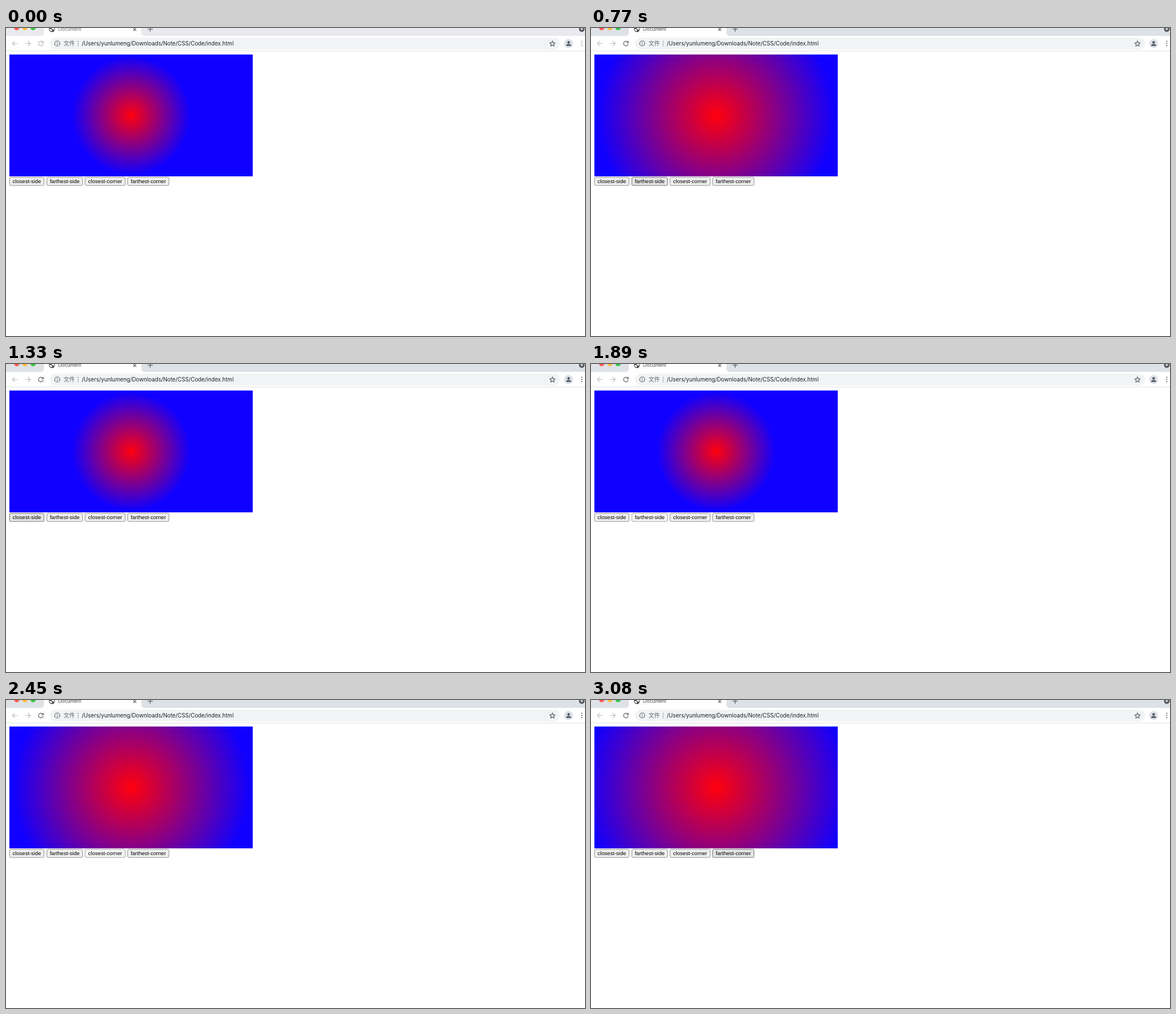
An HTML page that plays this animation: 1026x546 px, repeating every 3360 ms.

```html
<!DOCTYPE html>
<html lang="zh">
<head>
<meta charset="utf-8">
<title>Radial gradient sizes</title>
<style>
  html, body { margin: 0; width: 100%; height: 100%; overflow: hidden; background: #fff; }
  svg { display: block; }
  text { font-family: Inter, "Noto Sans CJK SC", "Noto Sans CJK", sans-serif; }
  .line { fill: none; stroke: #5f6368; stroke-width: 1.2; }
  .off { stroke: #babcbe; }
  .strip { fill: #dee1e6; }
  .title { fill: #45494d; }
  .reload { stroke: #5f6368; }
  .dots { fill: #5f6368; }
  .blurred .strip { fill: #e8eaed; }
  .blurred .title { fill: #6b6f73; }
  .blurred .reload { stroke: #b4b6b9; }
  .blurred .dots { fill: #a5a8ab; }
  .button rect { fill: #efefef; stroke: #767676; stroke-width: .8; }
  .button text { font: 9.58px "Liberation Sans", Arial, sans-serif; text-anchor: middle; }
  .hover rect { fill: #e5e5e5; stroke: #4f4f4f; }
  .active rect { fill: #f5f5f5; stroke: #8d8d8d; }
</style>
</head>
<body>
<svg id="stage" width="1026" height="546" viewBox="0 0 1026 546">
  <defs>
    <radialGradient id="glow" gradientUnits="userSpaceOnUse" cx="221.7" cy="155" r="108">
      <stop stop-color="#ff000c"/>
      <stop offset=".97" stop-color="#1000ff"/>
    </radialGradient>
  </defs>

  <!-- Tab strip -->
  <rect class="strip" width="1026" height="14"/>
  <path d="M61 14q6 0 6-6V-1H240V8q0 6 6 6z" fill="#fff"/>
  <circle cx="19" cy="-.6" r="4.6" fill="#fc5b57"/>
  <circle cx="33.5" cy="-.6" r="4.6" fill="#fdbc40"/>
  <circle cx="48" cy="-.6" r="4.6" fill="#34c84a"/>
  <circle cx="81.3" cy="2" r="5.2" fill="#45494d"/>
  <path d="M77 1.5l3 .6 1.7 1.6-.8 2.4q-3.4-.6-3.9-4.6zM82-1.5l3 .7.6 3.3-2 .8-1.2-1.5-2-.4z" fill="#fff"/>
  <text class="title" x="92.5" y="5.3" font-size="8.45">Document</text>
  <path class="line" d="M225.3-.3l5.4 5.4m0-5.4l-5.4 5.4M251 2.2h9M255.500-2.300v9"/>
  <circle cx="1020.3" cy="2" r="5" fill="#5a5d61"/>
  <path d="M1017.700 .8h5.200l-2.600 3z" fill="#fff"/>

  <!-- Toolbar -->
  <path d="M0 40.700H1026" stroke="#dcdee1"/>
  <rect x="78" y="17.300" width="904" height="20.400" rx="10.200" fill="#f1f3f4"/>
  <path class="line off" d="M20.300 27.500H11.500M15.800 23.200l-4.300 4.300 4.300 4.300M34.200 27.500H43M38.700 23.200l4.300 4.300-4.300 4.300"/>
  <path class="line reload" d="M65.300 25A4.200 4.200 0 1 0 66 28.500M66.200 22.800v3.300h-3.400"/>
  <circle class="line" cx="90.800" cy="27.500" r="4.500" stroke-width="1"/>
  <path class="line" d="M90.800 27v3M90.800 24.800v1.200"/>
  <text x="102" y="31.200" font-size="10" fill="#5f6368">文件</text>
  <path d="M127.800 22v11" stroke="#a9acb0"/>
  <text x="134.300" y="31" font-size="9.81" fill="#202124">/Users/yunlumeng/Downloads/Note/CSS/Code/index.html</text>
  <path class="line" stroke-linejoin="round" d="M968.300 22.800l1.400 3.300 3.500.3-2.700 2.300.8 3.500-3-1.900-3 1.900.8-3.500-2.700-2.300 3.500-.3z"/>
  <circle cx="997" cy="27.500" r="8" fill="#dee1e6"/>
  <circle cx="997" cy="25.500" r="2.200" fill="#46505f"/>
  <path d="M992.700 31.800v-.8q0-2.500 4.300-2.500t4.300 2.500v.8z" fill="#46505f"/>
  <g class="dots">
    <circle cx="1020.300" cy="23.700" r="1.100"/>
    <circle cx="1020.300" cy="27.500" r="1.100"/>
    <circle cx="1020.300" cy="31.300" r="1.100"/>
  </g>

  <!-- Page -->
  <rect x="6" y="47" width="431.300" height="216" fill="url(#glow)"/>
</svg>
<script>
  const stage = document.getElementById('stage');
  const glow = document.getElementById('glow');
  const LOOP = 3360;
  const CORNER = Math.hypot(216, 108);

  const buttons = [
    ['closest-side', 6, 61.7],
    ['farthest-side', 72, 64],
    ['closest-corner', 139.6, 72],
    ['farthest-corner', 215.2, 74]
  ].map(([label, x, width]) => {
    stage.insertAdjacentHTML('beforeend',
      `<g><rect x="${x + .4}" y="264.700" width="${width - .8}" height="14.400" rx="1.900"/>
       <text x="${x + width / 2}" y="275.200">${label}</text></g>`);
    return stage.lastElementChild;
  });

  // [start time, button under the pointer (-1: none), pointer state]
  const pointer = [
    [0, -1], [280, 0, 'hover'], [350, -1], [420, 1, 'hover'], [630, 1, 'active'],
    [770, 1, 'hover'], [910, 2, 'hover'], [1050, 0, 'hover'], [1260, 0, 'active'],
    [1330, 0, 'hover'], [1610, 1, 'hover'], [1890, 1, 'active'], [1960, 1, 'hover'],
    [2310, 2, 'hover'], [2450, 2, 'active'], [2590, 2, 'hover'], [2800, 3, 'hover'],
    [3010, 3, 'active'], [3080, 3, 'hover']
  ];

  // [start time, gradient radius]
  const radii = [[0, 108], [770, 216], [1330, 108], [1960, 216], [2590, CORNER]];

  const at = (steps, t) => steps.findLast(([start]) => start <= t);

  function draw(now) {
    const t = now % LOOP;
    const [, target, state] = at(pointer, t);
    stage.setAttribute('class', t < 70 ? 'blurred' : '');
    glow.setAttribute('r', at(radii, t)[1]);
    buttons.forEach((button, i) =>
      button.setAttribute('class', i === target ? `button ${state}` : 'button'));
  }

  const begin = performance.now();
  function tick() {
    draw(performance.now() - begin);
    requestAnimationFrame(tick);
  }
  tick();
</script>
</body>
</html>
```
